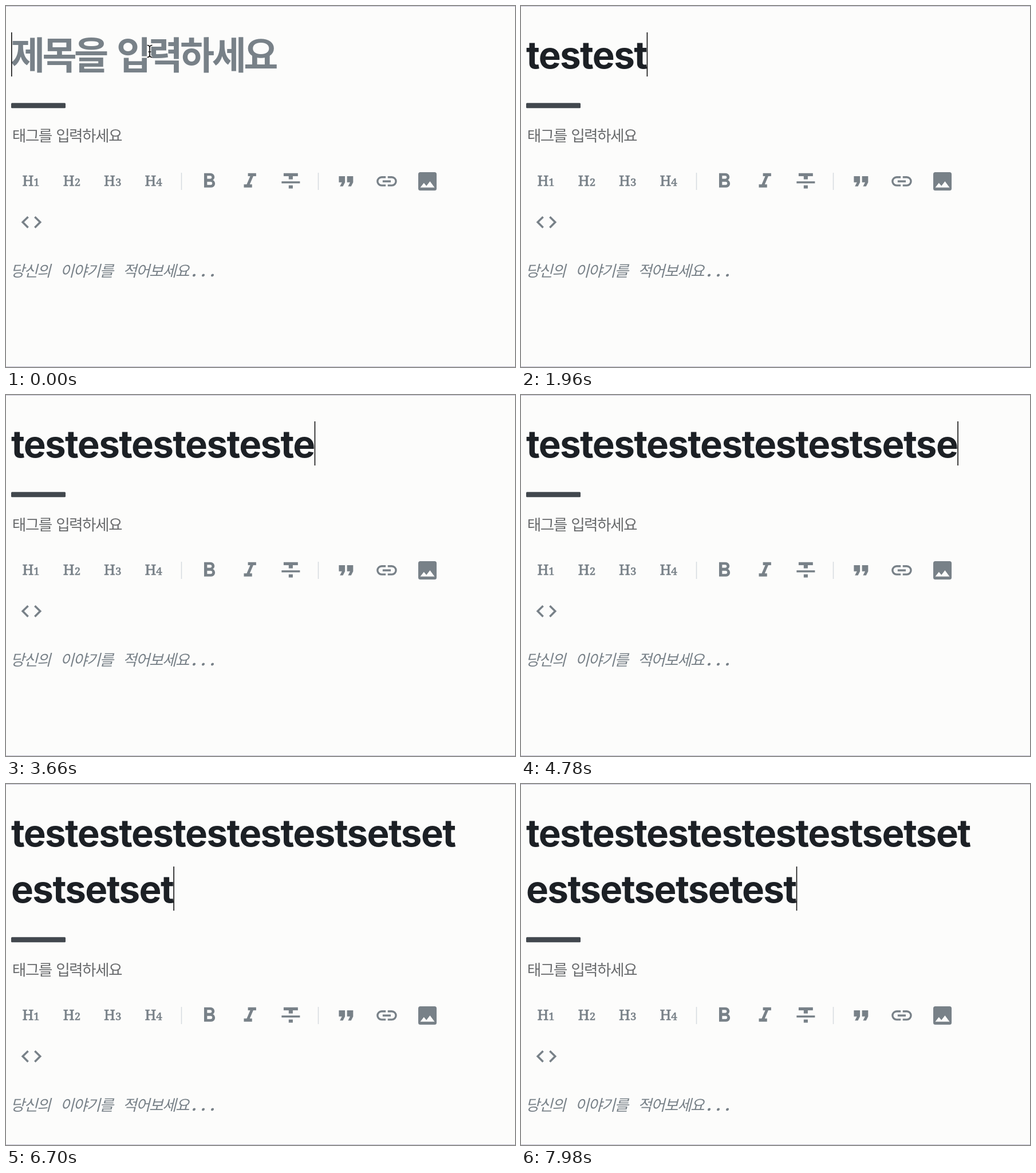
Animation, 889 px wide and 630 px high, one loop 8000 ms. Source, as an HTML page:

```html
<!DOCTYPE html>
<html lang="ko">
<head>
<meta charset="utf-8">
<style>
  html, body { margin: 0; width: 100%; height: 100%; overflow: hidden; background: #fcfcfb; }
  svg { display: block; width: 889px; height: 630px; }
  text { white-space: pre; }
  .title { font: bold 65.4px Inter, sans-serif; font-optical-sizing: none; letter-spacing: -.0243em; fill: #1c2025; }
  .hangul { font-family: "Noto Sans CJK KR", "Noto Sans CJK", sans-serif; }
  .hint { font-size: 65.4px; font-weight: bold; letter-spacing: -4.6px; word-spacing: 4.6px; }
  .tag { font-size: 26.7px; letter-spacing: -1.6px; word-spacing: 1.6px; fill: #696b6d; }
  .story { font-size: 26.7px; font-style: italic; letter-spacing: -1.5px; word-spacing: 11.3px; }
  .dots { font: italic bold 26.7px "Noto Sans Mono", monospace; }
  .heading { font: 25px "Noto Serif", serif; stroke: #788188; stroke-width: .7px; }
  .heading tspan { font-size: 18.5px; }
</style>
</head>
<body>
<svg viewBox="0 0 889 630" fill="#788188">
  <rect width="889" height="630" fill="#fcfcfb"/>
  <path d="M0 .5H889M0 629.5H889" stroke="#c3c1d0"/>
  <text id="hint" class="hangul hint" x="8" y="110">제목을 입력하세요</text>
  <text id="line1" class="title" x="9" y="109"></text>
  <text id="line2" class="title" x="9" y="207"></text>
  <g id="lower">
    <rect x="9" y="169.3" width="95" height="9" rx="1.5" fill="#42484e"/>
    <text class="hangul tag" x="10.8" y="236">태그를 입력하세요</text>
    <g id="toolbar"></g>
    <path d="M306.5 291V321M545.5 291V321" stroke="#d5dae0" stroke-width="1.5"/>
    <text class="hangul story" x="8" y="471.5">당신의 이야기를 적어보세요</text>
    <text class="dots" x="320" y="471.5">...</text>
  </g>
  <rect id="caret" y="46" width="1.6" height="77" fill="#111"/>
  <g id="pointer" fill="none">
    <path id="beam" d="M246.5 68.5q4.5 0 4.5 4v13q0 4 -4.5 4M255.5 68.5q-4.5 0 -4.5 4M251 85.5q0 4 4.5 4M248.5 80h5"/>
    <use href="#beam" stroke="#fff" stroke-width="4"/>
    <use href="#beam" stroke="#111" stroke-width="1.7"/>
  </g>
</svg>
<script>
const $ = id => document.getElementById(id);

// Icons on a 24-unit grid: left, top, outline
const icons = [
  [333.5, 284.6, "M15.6 10.79c.97-.67 1.65-1.77 1.65-2.79 0-2.26-1.75-4-4-4H7v14h7.04c2.09 0 3.71-1.7 3.71-3.79 0-1.52-.86-2.82-2.15-3.42zM10 6.5h3a1.5 1.5 0 0 1 0 3h-3zM13.5 15.5H10v-3h3.5a1.5 1.5 0 0 1 0 3z"],
  [404.8, 284.6, "M10 4v3h2.21l-3.42 8H6v3h8v-3h-2.21l3.42-8H18V4z"],
  [476, 284.6, "M10 19h4v-3h-4zM5 4v3h5v3h4V7h5V4zM3 14h18v-2H3z"],
  [572.5, 284.6, "M6 17h3l2-4V7H5v6h3zm8 0h3l2-4V7h-6v6h3z"],
  [643.6, 284.6, "M3.9 12A3.1 3.1 0 0 1 7 8.9h4V7H7a5 5 0 0 0 0 10h4v-1.9H7A3.1 3.1 0 0 1 3.9 12zM8 13h8v-2H8zM17 7h-4v1.9h4a3.1 3.1 0 0 1 0 6.2h-4V17h4a5 5 0 0 0 0-10z"],
  [714.7, 284.6, "M21 19V5a2 2 0 0 0-2-2H5a2 2 0 0 0-2 2v14a2 2 0 0 0 2 2h14a2 2 0 0 0 2-2zM8.5 13.5l2.5 3L14.5 12l4.5 6H5z"],
  [23.1, 356, "M9.4 16.6L4.8 12l4.6-4.6L8 6l-6 6 6 6zM14.6 16.6l4.6-4.6-4.6-4.6L16 6l6 6-6 6z"]
];
$("toolbar").innerHTML =
  [1, 2, 3, 4].map(n => `<text class="heading" x="${28.5 + 71.3 * (n - 1)}" y="314">H<tspan>${n}</tspan></text>`).join("") +
  icons.map(([x, y, d]) => `<path transform="translate(${x} ${y}) scale(1.78)" fill-rule="evenodd" d="${d}"/>`).join("");

const LOOP = 8000, WRAP = 25, LINE_HEIGHT = 98;
const title = "t" + "est".repeat(6) + "setset" + "est" + "set".repeat(3) + "est";
// Typing pace: time in ms, characters typed
const pace = [[0, 0], [699, 0], [700, 1], [1960, 7.5], [3660, 17.5], [4780, 24.5], [5740, 28.5], [6700, 34.5], [LOOP, 40.5]];

function typedAt(time) {
  const i = pace.findIndex(([end]) => time < end);
  const [t0, n0] = pace[i - 1], [t1, n1] = pace[i];
  return Math.floor(n0 + (n1 - n0) * (time - t0) / (t1 - t0));
}

function draw() {
  const count = typedAt(performance.now() % LOOP);
  const wrapped = count > WRAP;
  const shift = wrapped ? LINE_HEIGHT : 0;
  $("line1").textContent = title.slice(0, Math.min(count, WRAP));
  $("line2").textContent = title.slice(WRAP, Math.max(count, WRAP));
  $("hint").style.display = $("pointer").style.display = count ? "none" : "";
  $("lower").setAttribute("transform", `translate(0 ${shift})`);
  const width = count ? $(wrapped ? "line2" : "line1").getComputedTextLength() : 0;
  $("caret").setAttribute("x", 9 + width);
  $("caret").setAttribute("y", 46 + shift);
  requestAnimationFrame(draw);
}
draw();
</script>
</body>
</html>
```
